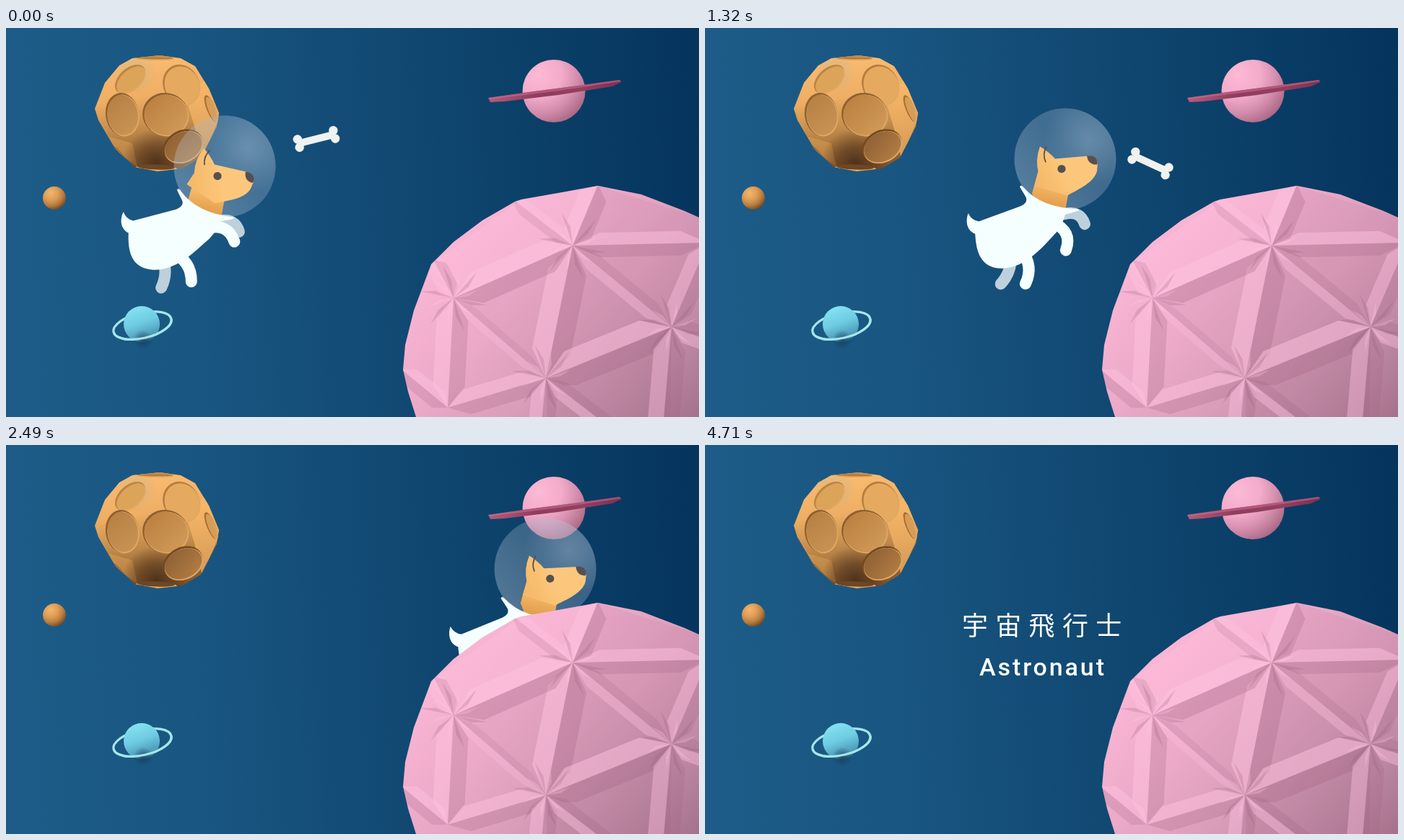
These frames come from a looping animation (960x540 px, 4740 ms). An HTML page with a canvas:

```html
<!DOCTYPE html>
<html lang="ja">
<head>
<meta charset="utf-8">
<title>Astronaut</title>
<style>
html, body { margin: 0; width: 100%; height: 100%; overflow: hidden; background: #164f7a; }
canvas { display: block; width: 960px; height: 540px; }
</style>
</head>
<body>
<canvas id="stage" width="960" height="540"></canvas>
<script>
const W = 960, H = 540, LOOP = 4740, STEP = 30, TAU = Math.PI * 2, DEG = Math.PI / 180;
const stage = document.getElementById('stage').getContext('2d');

const clamp = v => Math.max(0, Math.min(1, v));
const smooth = v => { v = clamp(v); return v * v * (3 - 2 * v); };

function layer(draw) {
  const canvas = document.createElement('canvas');
  canvas.width = W;
  canvas.height = H;
  draw(canvas.getContext('2d'));
  return canvas;
}

function withStops(gradient, stops) {
  stops.forEach(([at, color]) => gradient.addColorStop(at, color));
  return gradient;
}
const linear = (c, x0, y0, x1, y1, ...stops) =>
  withStops(c.createLinearGradient(x0, y0, x1, y1), stops);
const radial = (c, x, y, r, ...stops) =>
  withStops(c.createRadialGradient(x, y, 0, x, y, r), stops);

function trace(c, points) {
  c.beginPath();
  points.forEach(([x, y]) => c.lineTo(x, y));
  c.closePath();
}
function polygon(c, points, fill) {
  trace(c, points);
  c.fillStyle = fill;
  c.fill();
}
function ellipse(c, x, y, rx, ry, tilt, fill) {
  c.beginPath();
  c.ellipse(x, y, rx, ry, tilt * DEG, 0, TAU);
  c.fillStyle = fill;
  c.fill();
}
const disc = (c, x, y, r, fill) => ellipse(c, x, y, r, r, 0, fill);

// Smooth curve through keyed rows [time, value, value, ...]
function follow(keys, t) {
  const last = keys.length - 1;
  if (t >= keys[last][0]) return keys[last].slice(1);
  const i = Math.max(0, keys.findIndex(k => k[0] > t) - 1);
  const a = keys[i], b = keys[i + 1];
  const before = keys[Math.max(0, i - 1)], after = keys[Math.min(last, i + 2)];
  const span = b[0] - a[0], u = (t - a[0]) / span;
  return a.slice(1).map((_, n) => {
    const k = n + 1;
    const m0 = (b[k] - before[k]) / (b[0] - before[0]) * span;
    const m1 = (after[k] - a[k]) / (after[0] - a[0]) * span;
    return (2 * u ** 3 - 3 * u * u + 1) * a[k] + (u ** 3 - 2 * u * u + u) * m0
      + (3 * u * u - 2 * u ** 3) * b[k] + (u ** 3 - u * u) * m1;
  });
}

// ---------- Scenery ----------
function crater(c, x, y, rx, ry, tilt, fill, rim = '#8f6030') {
  ellipse(c, x, y, rx, ry, tilt, rim);
  ellipse(c, x + 1.5, y + 1.5, rx - 1, ry - 1, tilt, '#e0a862');
  ellipse(c, x + .8, y + .8, rx - 2, ry - 2, tilt, fill);
}

function crateredPlanet(c) {
  c.save();
  trace(c, [[157, 52], [175, 42], [213, 38], [242, 42], [262, 53], [281, 84], [295, 118],
    [292, 137], [270, 180], [245, 195], [210, 199], [178, 193], [151, 167], [128, 128],
    [123, 112], [137, 76]]);
  c.fillStyle = linear(c, 195, 38, 215, 200, [0, '#fabc72'], [.35, '#eeae63'],
    [.6, '#c58d4c'], [.82, '#9a6b3a'], [1, '#7c522b']);
  c.fill();
  c.clip();
  polygon(c, [[250, 100], [275, 72], [298, 118], [272, 182], [262, 140]], 'rgba(250,186,106,.65)');
  polygon(c, [[123, 112], [140, 150], [175, 160], [182, 193], [150, 168]], 'rgba(222,160,85,.5)');
  disc(c, 208, 188, 48, radial(c, 208, 188, 48, [0, 'rgba(68,42,22,.85)'], [.5, 'rgba(80,50,26,.55)'], [1, 'rgba(80,50,26,0)']));
  disc(c, 180, 62, 30, radial(c, 180, 62, 30, [0, 'rgba(205,180,135,.7)'], [1, 'rgba(205,180,135,0)']));
  crater(c, 172, 71, 25, 15, -42, '#dca458', '#bc8442');
  crater(c, 243, 79, 25, 29, -28, '#e5aa60', '#b67d3e');
  crater(c, 161, 120, 23, 30, -8, linear(c, 140, 95, 180, 145, [0, '#b57f43'], [1, '#c89454']));
  crater(c, 221, 120, 32, 30, 12, linear(c, 195, 95, 245, 145, [0, '#b97f40'], [1, '#d19a58']));
  crater(c, 245, 164, 29, 22, -27, linear(c, 225, 150, 265, 180, [0, '#8d6035'], [1, '#b27c43']), '#74491f');
  crater(c, 284, 112, 6, 20, -22, '#d79c55', '#a8702f');
  crater(c, 154, 176, 6, 19, -42, '#b7823f', '#84562a');
  crater(c, 205, 41, 27, 3.5, 1, '#b67a38', '#c88a45');
  ellipse(c, 208, 195, 29, 5, 2, '#e7ac62');
  ellipse(c, 208, 193, 26, 3.6, 2, '#6d4726');
  c.restore();
}

function bluePlanet(c) {
  const x = 188, y = 411;
  const ring = () => {
    c.beginPath();
    c.ellipse(189, 413, 41, 17.5, -13 * DEG, 0, TAU);
    c.strokeStyle = '#a6e6ec';
    c.lineWidth = 3.2;
    c.stroke();
  };
  ring();
  disc(c, x, y, 25, linear(c, 180, 386, 198, 437, [0, '#83e3f3'], [.45, '#6fcbe1'], [.8, '#4d9dbb'], [1, '#28566f']));
  disc(c, 190, 433, 14, radial(c, 190, 433, 14, [0, 'rgba(20,52,80,.65)'], [1, 'rgba(20,52,80,0)']));
  c.save();
  c.beginPath();
  c.moveTo(130, 427);
  c.lineTo(250, 399);
  c.lineTo(250, 470);
  c.lineTo(130, 470);
  c.clip();
  ring();
  c.restore();
}

function ringedPlanet(c) {
  disc(c, 759, 87.5, 43.5, radial(c, 739, 65, 76, [0, '#fdb9d6'], [.4, '#f3acca'], [.68, '#d58fae'], [1, '#a5647f']));
  polygon(c, [[668, 97], [716, 90], [800, 79], [850, 72], [853, 75], [840, 81], [765, 93], [690, 102], [671, 103]],
    linear(c, 668, 0, 853, 0, [0, '#b65b7c'], [.35, '#8f3d5d'], [.7, '#943f60'], [1, '#7c3150']));
  polygon(c, [[668, 97], [850, 72], [852, 74], [760, 88], [670, 99]], 'rgba(205,110,145,.55)');
}

const backdrop = layer(c => {
  c.fillStyle = linear(c, 0, 30, 960, -20, [0, '#1d5c88'], [.25, '#195681'], [.5, '#124b75'], [.75, '#0b4068'], [1, '#05345d']);
  c.fillRect(0, 0, W, H);
  crateredPlanet(c);
  disc(c, 67, 236, 16, radial(c, 62, 229, 25, [0, '#f5b56a'], [.4, '#dd9d55'], [.7, '#b67c40'], [1, '#6d4522']));
  bluePlanet(c);
  ringedPlanet(c);
});

// A bar between two hubs, pointed at both ends, lit on one side
function ridge(c, [ax, ay], [bx, by], width = 24, strength = 1) {
  const dx = bx - ax, dy = by - ay, len = Math.hypot(dx, dy);
  const at = (along, side) => [ax + dx * along - dy / len * side, ay + dy * along + dx / len * side];
  const half = (side, fill) => polygon(c, [[ax, ay], at(.2, side), at(.8, side), [bx, by]], fill);
  half(width, `rgba(255,195,224,${.5 * strength})`);
  half(-width, `rgba(154,94,124,${.26 * strength})`);
}

function star(c, [x, y], size) {
  for (let i = 0; i < 12; i++) {
    const a = i * TAU / 12 + .2, r = size * (i % 2 ? .75 : 1);
    const tip = [x + r * Math.cos(a), y + r * Math.sin(a)];
    const edge = [x + r * .55 * Math.cos(a + .2), y + r * .55 * Math.sin(a + .2)];
    polygon(c, [[x, y], tip, edge], i % 2 ? 'rgba(255,200,226,.3)' : 'rgba(146,86,116,.22)');
  }
}

const foreground = layer(c => {
  const top = [785, 302], left = [620, 375], low = [748, 486], right = [922, 415], corner = [612, 527], far = [972, 298];
  c.save();
  trace(c, [[820, 219], [880, 231], [940, 254], [960, 263], [960, 540], [568, 540], [557, 505],
    [550, 474], [553, 440], [565, 392], [589, 328], [620, 297], [660, 267], [705, 241], [714, 238], [765, 229]]);
  c.fillStyle = linear(c, 600, 280, 930, 580, [0, '#fcb9d7'], [.3, '#edabc9'], [.55, '#d99db9'], [.8, '#bd88a3'], [1, '#a47089']);
  c.fill();
  c.clip();
  polygon(c, [top, right, low], 'rgba(175,115,145,.22)');
  polygon(c, [left, top, low], 'rgba(195,130,162,.16)');
  polygon(c, [top, far, right], 'rgba(190,120,152,.2)');
  polygon(c, [low, right, [920, 560], [750, 560]], 'rgba(150,92,120,.16)');
  polygon(c, [[714, 238], [820, 219], top, left, [589, 328]], 'rgba(255,190,220,.4)');
  polygon(c, [[820, 219], [960, 263], far, top], 'rgba(195,125,158,.18)');
  ridge(c, top, low, 27);
  ridge(c, top, left, 23);
  ridge(c, right, low, 25);
  ridge(c, top, right, 13, .7);
  ridge(c, far, top, 17, .9);
  ridge(c, [820, 217], top, 20, .9);
  ridge(c, top, [700, 236], 11, .6);
  ridge(c, left, corner, 22, .9);
  ridge(c, left, low, 10, .5);
  ridge(c, low, corner, 18, .9);
  ridge(c, low, [738, 590], 18, .8);
  ridge(c, low, [850, 565], 13, .8);
  ridge(c, right, [908, 580], 22, .8);
  ridge(c, far, right, 18, .8);
  ridge(c, right, [1020, 450], 16, .8);
  ridge(c, [592, 322], left, 14, .7);
  ridge(c, corner, [548, 474], 14, .8);
  [top, left, low, right].forEach(hub => star(c, hub, 48));
  c.restore();
});

// ---------- Dog ----------
const SUIT = '#f6ffff', SHADE = '#bdd0dc', DARK = '#565052';

// time, x, y, body turn, head turn, eye offset, near arm, far arm, near leg, far leg
const dogKeys = [
  [0, 303, 192, 2, 18, -10, -6, 0, -14, -8],
  [870, 446, 229, 0, 4, -3, 0, 12, 0, 0],
  [1320, 499, 182, -3, 0, -5, 38, 3, 16, 14],
  [2070, 623, 158, -5, 3.5, 3, 76, 100, 62, 25],
  [2940, 903, 202, -5, 0, 10, 40, 60, 20, 10],
  [3390, 1085, 262, -5, 0, 12, 0, 0, 0, 0]
];

function limb(c, [x, y], turn, [kx, ky], [px, py], color) {
  c.save();
  c.translate(x, y);
  c.rotate(turn * DEG);
  c.beginPath();
  c.moveTo(0, 0);
  c.quadraticCurveTo(kx, ky, px, py);
  c.strokeStyle = color;
  c.lineWidth = 16;
  c.lineCap = 'round';
  c.stroke();
  c.restore();
}

function helmet(c) {
  disc(c, 0, 0, 70.5, linear(c, -60, 50, 50, -50, [0, 'rgba(190,200,214,.4)'], [.6, 'rgba(170,186,208,.3)'], [1, 'rgba(175,192,212,.34)']));
  disc(c, 0, 0, 70.5, radial(c, 32, -25, 62, [0, 'rgba(205,220,236,.26)'], [1, 'rgba(205,220,236,0)']));
}

function head(c, eyeX, turn) {
  c.save();
  c.translate(eyeX, 13.5);
  polygon(c, [[-32, 2], [-41, 34], [-30, 62], [4, 64], [9, 36], [20, 15]],
    linear(c, 0, 15, -8, 58, [0, '#fbc476'], [.6, '#eaa957'], [1, '#dc9a4a']));
  c.rotate(turn * DEG);
  c.beginPath();
  c.moveTo(-30, -31);
  c.quadraticCurveTo(-37, -12, -32, 6);
  c.lineTo(-37, 24);
  c.lineTo(8, 37);
  c.bezierCurveTo(24, 28, 45, 19, 49, 3);
  c.lineTo(50, -9);
  c.quadraticCurveTo(47, -18, 38, -18);
  c.lineTo(-9, -14);
  c.quadraticCurveTo(-17, -23, -30, -31);
  c.fillStyle = linear(c, -30, 20, 40, -15, [0, '#f6b969'], [.5, '#fcc77b'], [1, '#fcc77c']);
  c.fill();
  c.beginPath();
  c.moveTo(35, -18);
  c.quadraticCurveTo(48, -20, 50, -9);
  c.lineTo(49, -6);
  c.quadraticCurveTo(37, -5, 35, -18);
  c.fillStyle = DARK;
  c.fill();
  disc(c, 0, 0, 5.6, DARK);
  c.beginPath();
  c.moveTo(-21, -31);
  c.quadraticCurveTo(-27, -20, -22, -9);
  c.strokeStyle = DARK;
  c.lineWidth = 1.8;
  c.stroke();
  c.restore();
}

function torso(c) {
  c.beginPath();
  c.moveTo(-65, 35);
  c.quadraticCurveTo(-63, 31, -59, 37);
  c.quadraticCurveTo(-36, 66, 14, 70);
  c.quadraticCurveTo(17, 72, 13, 73);
  c.lineTo(-4, 77);
  c.quadraticCurveTo(-10, 96, -25, 108);
  c.bezierCurveTo(-47, 130, -68, 147, -94, 147);
  c.bezierCurveTo(-126, 146, -130, 120, -130, 97);
  c.bezierCurveTo(-143, 91, -142, 76, -138, 68);
  c.quadraticCurveTo(-134, 78, -124, 80);
  c.lineTo(-65, 62);
  c.quadraticCurveTo(-54, 57, -57, 50);
  c.closePath();
  c.fillStyle = SUIT;
  c.fill();
}

function dog(c, t) {
  const [x, y, bodyTurn, headTurn, eyeX, nearArm, farArm, nearLeg, farLeg] = follow(dogKeys, t);
  c.save();
  c.translate(x, y);
  helmet(c);
  head(c, eyeX, headTurn);
  c.rotate(bodyTurn * DEG);
  limb(c, [-5, 76], farArm, [22, -5], [28, 14], SHADE);
  limb(c, [-82, 128], farLeg, [6, 24], [-6, 43], SHADE);
  torso(c);
  limb(c, [-22, 87], nearArm, [30, -6], [37, 21], SUIT);
  limb(c, [-68, 122], nearLeg, [23, 18], [17, 45], SUIT);
  c.restore();
}

// ---------- Bone and title ----------
const boneKeys = [
  [0, 430, 154, -14],
  [870, 552, 158, 33],
  [1320, 617, 188, 25],
  [2070, 894, 170, -13],
  [2430, 1030, 150, -30]
];

function bone(c, t) {
  const [x, y, turn] = follow(boneKeys, t);
  c.save();
  c.translate(x, y);
  c.rotate(turn * DEG);
  c.fillStyle = '#f0f2f2';
  c.fillRect(-25, -5, 50, 10);
  for (const sx of [-1, 1])
    for (const sy of [-1, 1]) disc(c, sx * 25.5, sy * 5.8, 6.2, '#f0f2f2');
  c.restore();
}

function title(c, t) {
  const alpha = smooth((t - 2520) / 300);
  if (!alpha) return;
  c.save();
  c.globalAlpha = alpha;
  c.fillStyle = '#fff';
  c.textAlign = 'center';
  c.font = "500 36px 'Noto Sans CJK TC', 'Noto Sans CJK JP', 'Noto Sans CJK', sans-serif";
  [...'宇宙飛行士'].forEach((char, i) => {
    const rise = smooth((t - 2650 - i * 90) / 480);
    c.fillText(char, 374 + i * 46.3, 264 + 12 * (1 - rise));
  });
  c.textAlign = 'left';
  c.font = '500 34px Roboto, sans-serif';
  c.letterSpacing = '2.9px';
  c.fillText('Astronaut', 380, 320 + 12 * (1 - smooth((t - 2660) / 480)));
  c.restore();
}

function render(t) {
  stage.drawImage(backdrop, 0, 0);
  title(stage, t);
  bone(stage, t);
  dog(stage, t);
  stage.drawImage(foreground, 0, 0);
}

let start;
function tick(now) {
  start ??= now;
  const t = (now - start) % LOOP;
  render(Math.floor(t / STEP) * STEP);
  requestAnimationFrame(tick);
}
render(0);
requestAnimationFrame(tick);
</script>
</body>
</html>
```
